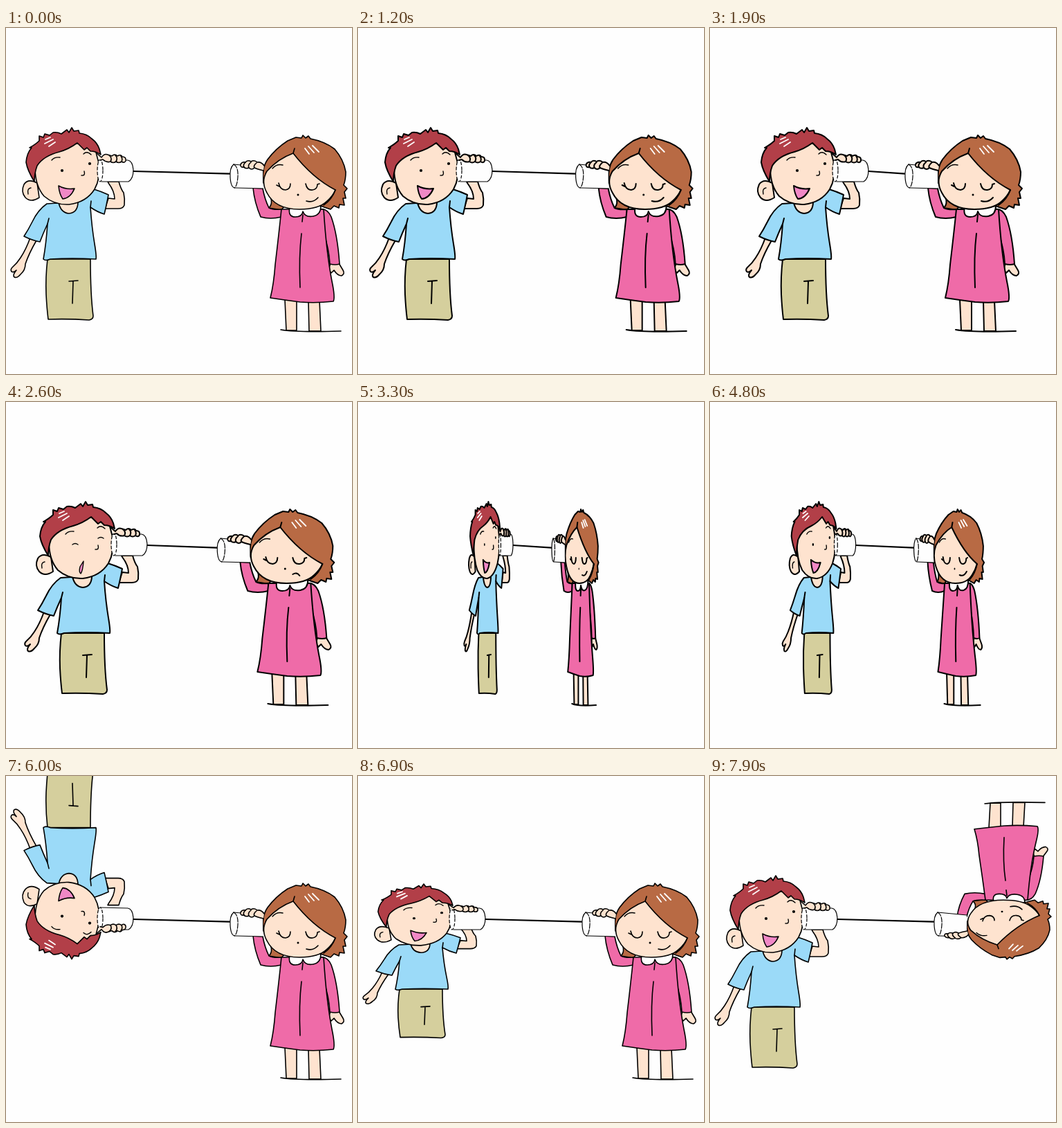
An HTML page that plays this animation: 500 by 500 pixels, repeating every 8 s.

```html
<!DOCTYPE html>
<html lang="en">
<head>
<meta charset="utf-8">
<title>Tin can telephone</title>
<style>
html, body { margin: 0; width: 100%; height: 100%; overflow: hidden; background: #fefefe; }
svg { display: block; width: 100vw; height: 100vh; }
#scene { fill: none; stroke: #000; stroke-linecap: round; stroke-linejoin: round; }
#scene path, #scene ellipse { vector-effect: non-scaling-stroke; }
.skin { fill: #fee3cf; }
.red { fill: #b23f48; }
.brown { fill: #b86a44; }
.blue { fill: #9bdaf8; }
.khaki { fill: #d5cf9d; }
.pink { fill: #ef6ba8; }
.tongue { fill: #f088c6; }
.white { fill: #fefefe; }
.dot { fill: #000; stroke: none; }
.shine { stroke: #fff; stroke-width: 1.8; }
.can { fill: #fefefe; stroke-width: 1.2; }
.thin { stroke-width: 1.4; }
</style>
</head>
<body>
<svg viewBox="0 0 500 500">
<g id="scene">
  <path id="string" stroke-width="2.1"/>

  <g id="boy">
    <g class="flip">
      <path class="skin" d="M147 222H163Q166 233 170 238Q172 247 171 256Q169 261 162 261L143 261L148 246L157 247Q157 236 148 224Z"/>
      <path class="skin" d="M35 303Q29 320 21 332Q16 340 9 346Q6 349 8 352Q11 354 15 350Q9 357 12 360Q16 362 21 356Q28 350 28 341Q33 326 44 307Z"/>
      <path class="khaki" d="M60 334Q57 360 58 385Q59 405 61 421Q90 420 120 422Q126 421 126 416Q122 385 122 334Z"/>
      <path d="M91 366L104 365M97 366L96 398"/>
      <path class="blue" d="M59 254Q46 263 38 280Q32 292 26 301Q38 307 49 309Q54 296 60 283Q58 312 54 334Q57 337 64 334Q95 332 130 334Q131 330 128 312Q124 288 122 259Q132 266 142 269Q145 257 148 241Q137 236 127 233Q118 243 105 251Z"/>
      <path d="M60 283L62 275M122 259L123 250"/>
      <path class="skin" d="M76 252Q79 267 91 268Q104 267 104 251Z"/>
      <path class="skin" d="M45 224Q32 217 26 226Q21 237 28 245Q36 253 48 245Z"/>
      <path class="thin" d="M36 231Q30 232 32 240"/>
      <path class="skin" d="M42 202Q42 228 55 243Q70 256 91 255Q116 252 128 233Q137 217 134 195L128 172L95 160L50 178Z"/>
      <path class="red" d="M41 222Q31 206 29 194Q30 181 37 173L34 173Q43 168 48 163L48 156L54 158L56 153L63 155L68 151Q74 150 80 153L88 147L91 151L95 144L98 149L105 148L106 152Q117 153 124 160Q132 166 135 175L137 183Q130 178 122 178L117 173L113 176L103 166Q91 175 77 179Q54 185 45 199Q41 210 41 222Z"/>
      <path class="shine" d="M57 161L64 158M56 167L68 161M62 171L71 165"/>
      <path class="thin" d="M66 191Q70 186 78 187M112 182Q117 177 123 183M109 213Q115 214 113 207"/>
      <g class="awake">
        <circle class="dot" cx="81" cy="206" r="2.1"/><circle class="dot" cx="121" cy="196" r="2.1"/>
        <path class="tongue" d="M76 228Q87 234 99 232Q93 246 82 247Q77 240 76 228Z"/>
      </g>
      <g class="asleep">
        <path class="thin" d="M76 206Q80 203 84 206M113 197Q117 194 121 197"/>
        <path class="tongue thin" d="M92 230Q91 244 88 248Q85 246 87 238Z"/>
      </g>
    </g>
    <path class="can" d="M136 190L176 191Q183 192 184 205Q184 218 177 222L138 222"/>
    <ellipse class="can" cx="136" cy="206" rx="4" ry="16" stroke-dasharray="4 3"/>
    <g class="flip">
      <path class="skin" d="M131 181L138 187Q142 181 147 183L153 185Q157 181 161 185Q166 182 168 186Q174 186 173 192Q171 196 167 193Q163 196 159 193Q155 196 151 193Q145 195 140 190L136 191"/>
      <path d="M149 184Q154 188 151 193M158 184Q162 188 159 193M166 185Q169 189 167 193"/>
    </g>
  </g>

  <g id="girl">
    <g class="flip">
      <path class="skin" d="M403 392L405 437H420V394ZM437 394L438 438H455L453 394Z"/>
      <path d="M397 436Q420 440 484 438"/>
      <path class="skin" d="M469 340Q465 350 470 354L474 350Q479 358 485 358Q490 355 487 350L481 340Z"/>
      <path class="brown" d="M382 244Q386 254 380 260L398 263L408 250Z"/>
      <path class="pink" d="M357 231Q359 252 368 273Q382 277 398 273V262Q386 263 380 260Q374 248 371 232Z"/>
      <path class="pink" d="M454 262Q464 260 470 273Q479 298 482 341Q476 343 468 341Q467 320 459 296Z"/>
      <path class="pink" d="M398 262Q394 300 389 342Q387 370 382 390Q402 393 425 396Q448 398 473 395Q476 390 471 366Q463 325 459 262Z"/>
      <path d="M429 270L428 280M427 297Q423 330 425 375"/>
      <path class="white" d="M410 259Q407 273 418 273Q428 273 429 265Q432 274 444 272Q455 270 455 257Z"/>
      <path class="brown" d="M372 224Q369 203 378 190Q390 174 407 163L419 158L427 159L429 155L433 159L437 156L440 160Q461 164 475 175Q488 190 491 208Q491 219 488 227L493 232L489 237L491 246L487 246L489 256L482 255L481 260L474 257L469 262L460 259Z"/>
      <path class="skin" d="M415 181Q393 189 377 207Q368 222 377 238Q389 262 424 262Q452 262 464 250Q472 243 476 234Q443 217 415 181Z"/>
      <path d="M415 181L417 174M476 234Q471 248 459 256"/>
      <path class="shine" d="M432 174L438 182M437 171L445 180M443 170L452 179"/>
      <path class="thin" d="M385 203Q391 196 400 198"/>
      <path d="M394 224Q396 234 404 234Q411 233 411 225M391 227L395 229M433 225Q435 235 443 234Q450 233 450 226L453 225"/>
      <circle class="dot" cx="422" cy="241" r="1.5"/>
      <path class="awake" d="M434 250Q444 253 451 245"/>
      <path class="asleep" d="M433 249Q439 245 443 251"/>
    </g>
    <path class="can" d="M371 201L329 197Q323 202 324 216Q325 231 331 231L371 232"/>
    <path class="can" d="M329 197Q336 201 335 215Q334 229 330 231" stroke-dasharray="7 2"/>
    <g class="flip">
      <path class="skin" d="M372 206Q363 204 359 202Q355 206 351 202Q346 204 344 201Q338 202 339 197Q341 193 346 194Q349 190 354 193Q359 190 363 194Q369 193 373 199"/>
      <path d="M346 194Q342 198 344 201M354 194Q349 198 351 202M362 195Q357 199 359 202"/>
    </g>
  </g>
</g>
</svg>
<script>
const LOOP = 8000, STEP = 100;
const MIRROR_X = 250.7, BOY_AXIS = 204.3, GIRL_AXIS = 216;
const $ = id => document.getElementById(id);
const all = query => document.querySelectorAll(query);
const scene = $('scene'), string = $('string'), boy = $('boy'), girl = $('girl');

// Linear rise for one second from start, then back down for one second.
const swing = (t, start) => Math.max(0, 1 - Math.abs(t - start - 1000) / 1000);

function flip(person, amount, axis) {
  const s = 1 - 2 * amount;
  person.querySelectorAll('.flip').forEach(g => {
    g.setAttribute('transform', `translate(0 ${axis * (1 - s)}) scale(1 ${s})`);
    g.setAttribute('visibility', Math.abs(s) < 0.01 ? 'hidden' : 'inherit');
  });
}

function show(query, on) {
  all(query).forEach(el => el.setAttribute('visibility', on ? 'inherit' : 'hidden'));
}

function draw(t) {
  const near = swing(t, 1000);
  const boyX = 50 * near, girlX = -46.67 * near;
  boy.setAttribute('transform', `translate(${boyX} 0)`);
  girl.setAttribute('transform', `translate(${girlX} 0)`);
  string.setAttribute('d', `M${184 + boyX} 207L${324 + girlX} 210.6`);

  const turn = 1 - 2 * swing(t, 3000);
  scene.setAttribute('transform', `translate(${MIRROR_X * (1 - turn)} 0) scale(${turn} 1)`);
  scene.setAttribute('visibility', Math.abs(turn) < 0.01 ? 'hidden' : 'visible');
  scene.setAttribute('stroke-width', t >= 1000 && t < 5000 ? 2 : 1.6);

  flip(boy, swing(t, 5000), BOY_AXIS);
  flip(girl, swing(t, 7000), GIRL_AXIS);

  const sleepy = t > 2000 && t < 3000;
  show('.awake', !sleepy);
  show('.asleep', sleepy);
}

const begin = performance.now();
function tick() {
  const t = (performance.now() - begin) % LOOP;
  draw(Math.floor(t / STEP) * STEP);
  requestAnimationFrame(tick);
}
draw(0);
requestAnimationFrame(tick);
</script>
</body>
</html>
```
